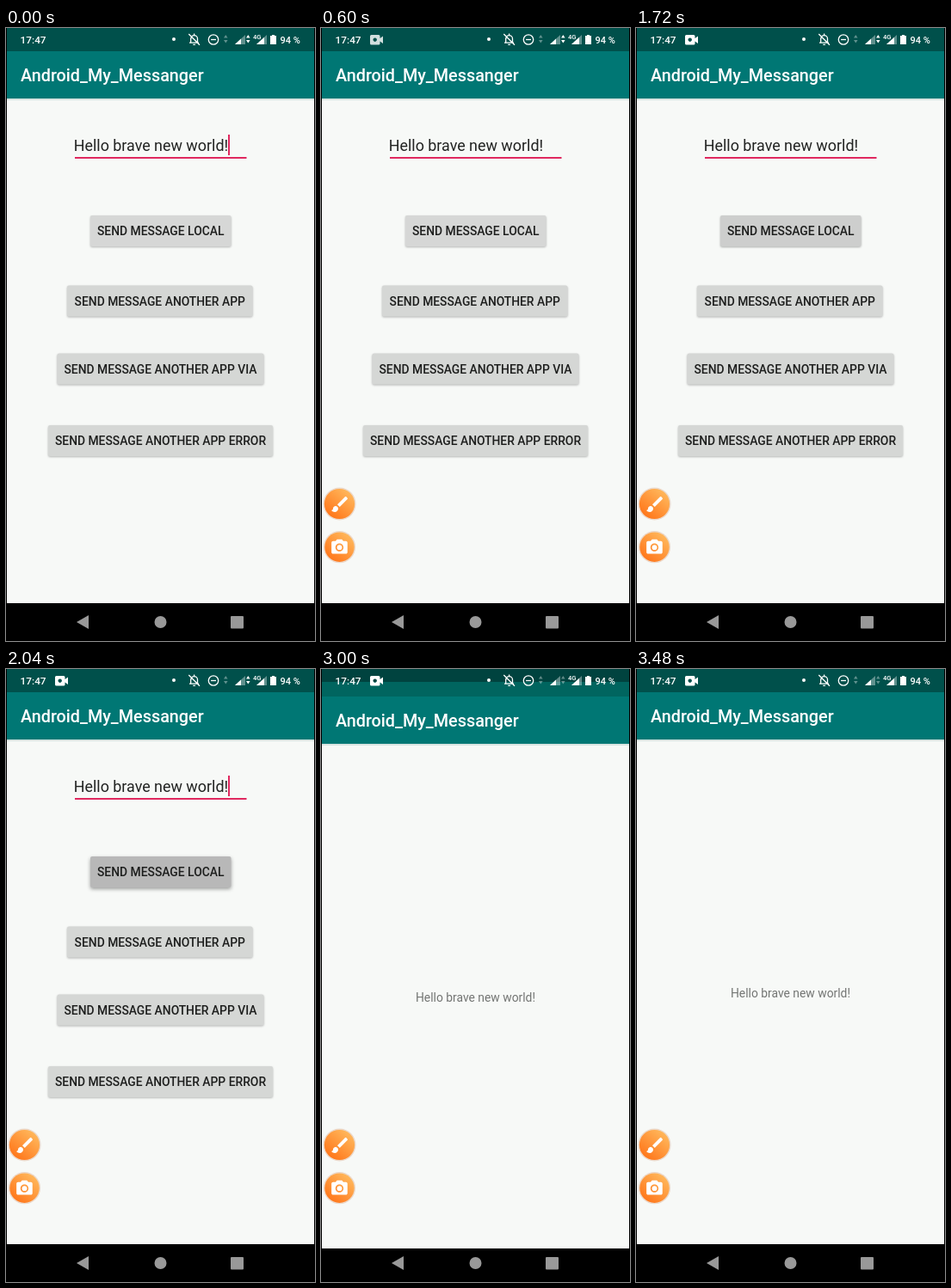
Animation, 359 px wide and 713 px high, one loop 4080 ms. Source, as an HTML page:

```html
<!DOCTYPE html>
<html lang="en">
<head>
<meta charset="utf-8">
<style>
  html, body { margin: 0; width: 100%; height: 100%; overflow: hidden; background: #000; }
  svg { display: block; width: 359px; height: 713px; font-family: Roboto, sans-serif; }
  .title { font-size: 19.8px; font-weight: 500; fill: #fff; }
  .status { font-weight: 500; fill: #fff; }
  .button { font-size: 13.87px; font-weight: 500; fill: #1d1e1d; text-anchor: middle; }
  .shadowed { filter: drop-shadow(0 1px 1px #0004); }
</style>
</head>
<body>
<svg viewBox="0 0 359 713">
  <defs>
    <linearGradient id="orange" x1="0.85" y1="0.1" x2="0.2" y2="0.9">
      <stop offset="0" stop-color="#ffb85c"/>
      <stop offset="1" stop-color="#ff781c"/>
    </linearGradient>
  </defs>

  <rect x="1" width="357" height="34" fill="#00504b" id="statusBar"/>
  <rect x="1" y="15" width="357" height="18" fill="#00655f" id="statusLower"/>

  <g id="page">
    <rect x="1" y="82" width="357" height="587" fill="#f7f9f7"/>
    <rect x="1" y="82" width="357" height="2" fill="#00504b" opacity=".13"/>
    <rect x="1" y="27" width="357" height="55" fill="#007774"/>
    <text x="17" y="62" class="title">Android_My_Messanger</text>

    <g id="form">
      <text x="78.7" y="143" font-size="17.9" fill="#222322">Hello brave new world!</text>
      <rect x="80" y="150" width="199.5" height="2" fill="#e0285f"/>
      <rect x="258" y="124" width="2" height="24" fill="#e0285f" id="cursor"/>
      <g id="buttons"></g>
    </g>
    <text id="result" x="179.5" y="381.5" font-size="13.87" fill="#737573" text-anchor="middle">Hello brave new world!</text>
  </g>

  <g class="status">
    <text x="16.6" y="18" font-size="11.8">17:47</text>
    <text x="318.6" y="18" font-size="11">94 %</text>
    <text x="287" y="13" font-size="7.6">4G</text>
    <path id="recorder" fill-rule="evenodd" d="M58.5 8H67q1.500 0 1.500 1.500V12L72 9.500V18L68.500 15.500V18q0 1.500-1.500 1.500H58.500q-1.500 0-1.500-1.500V9.500q0-1.500 1.500-1.500ZM62.700 11.500a2.200 2.200 0 1 0 .01 0Z"/>
    <circle cx="195" cy="13" r="2"/>
    <g fill="none" stroke="#fff" stroke-width="1.3">
      <path d="M214.700 17V12.500a3.900 3.900 0 0 1 7.800 0V17M213 17.200H224M217.300 19.300H220M218.600 6.500V8.500M212.300 7L225 19.700"/>
      <circle cx="241" cy="13.5" r="5.7"/>
      <path d="M238 13.500H244"/>
    </g>
    <path id="arrows1" d="M253 11.500L255.300 8L257.600 11.500ZM253 14L255.300 17.500L257.600 14Z" opacity=".38"/>
    <path id="arrows2" d="M279 11.500L281.300 8L283.600 11.500ZM279 14L281.300 17.500L283.600 14Z"/>
    <path d="M266 19H278V8Z" opacity=".38"/>
    <path d="M266 19H273V12.600Z"/>
    <path d="M291 19H303V8Z" opacity=".38"/>
    <path d="M291 19H300V10.800Z"/>
    <path d="M307 9H309V8H312V9H314V19H307Z"/>
  </g>

  <g id="navigation">
    <rect id="navBar" y="669" width="359" height="44"/>
    <g fill="#999">
      <path d="M82 691L96 683V699Z"/>
      <circle cx="179.5" cy="691" r="7"/>
      <rect x="261" y="684" width="15" height="14.500" rx="1"/>
    </g>
  </g>

  <g id="tools" fill="#fff">
    <circle cx="21.5" cy="553.5" r="19" fill="#ecd8c9"/>
    <circle cx="21.5" cy="553.5" r="17.6" fill="url(#orange)"/>
    <path transform="translate(10 542)" d="M7 14c-1.660 0-3 1.340-3 3 0 1.310-1.160 2-2 2 .92 1.220 2.490 2 4 2 2.210 0 4-1.790 4-4 0-1.660-1.340-3-3-3zm13.710-9.370l-1.340-1.340c-.39-.39-1.020-.39-1.410 0L9 12.250 11.750 15l8.960-8.960c.39-.39.39-1.020 0-1.410z"/>
    <circle cx="21.5" cy="603.7" r="18.6" fill="#ecd8c9"/>
    <circle cx="21.5" cy="603.7" r="17.2" fill="url(#orange)"/>
    <path transform="translate(10.3 593) scale(.93)" d="M9 2L7.170 4H4c-1.100 0-2 .9-2 2v12c0 1.100.9 2 2 2h16c1.100 0 2-.9 2-2V6c0-1.100-.9-2-2-2h-3.170L15 2H9zm3 15c-2.760 0-5-2.240-5-5s2.240-5 5-5 5 2.240 5 5-2.240 5-5 5z"/>
    <circle cx="21.5" cy="604.2" r="2.9"/>
  </g>
</svg>
<script>
const LOOP = 4080;
const el = id => document.getElementById(id);
const ramp = (t, from, to) => Math.min(1, Math.max(0, (t - from) / (to - from)));
const show = (id, visible) => el(id).style.display = visible ? "" : "none";

// label, top, left, width
const buttons = [
  ["SEND MESSAGE LOCAL", 218, 98, 163.5],
  ["SEND MESSAGE ANOTHER APP", 299.5, 71, 215.5],
  ["SEND MESSAGE ANOTHER APP VIA", 378.5, 59.5, 240],
  ["SEND MESSAGE ANOTHER APP ERROR", 462, 49, 261]
];
el("buttons").innerHTML = buttons.map(([label, top, left, width]) => `
  <rect class="shadowed" x="${left}" y="${top}" width="${width}" height="36" rx="2" fill="#d5d7d5"/>
  <text class="button" x="${left + width / 2}" y="${top + 23.3}">${label}</text>`).join("");
const pressed = el("buttons").querySelector("rect");

function draw(t) {
  const opened = t >= 3000;
  const entering = opened && t < 3160;

  show("form", !opened);
  show("result", opened);
  show("statusLower", entering);
  el("statusBar").setAttribute("fill", entering ? "#00433f" : "#00504b");
  el("page").setAttribute("transform", `translate(0 ${entering ? 5 : 0})`);
  el("navBar").setAttribute("y", entering ? 674 : 669);

  show("cursor", Math.floor((t + 100) / 500) % 2 === 0);
  el("tools").style.opacity = ramp(t, 40, 320);
  el("recorder").style.opacity = 0.8 * ramp(t, 200, 560) + 0.2 * ramp(t, 560, 960);
  el("arrows2").style.opacity = t < 2600 ? 1 : 0.38;

  const press = ramp(t, 1600, 2000) - ramp(t, 2400, 2760);
  const shade = 214 - 30 * press;
  pressed.setAttribute("fill", `rgb(${shade} ${shade + 1 - press} ${shade})`);
  pressed.style.filter = `drop-shadow(0 ${1 + press}px ${1 + press}px rgb(0 0 0 / ${0.27 + 0.1 * press}))`;
}

function frame() {
  draw(performance.now() % LOOP);
  requestAnimationFrame(frame);
}
frame();
</script>
</body>
</html>
```
